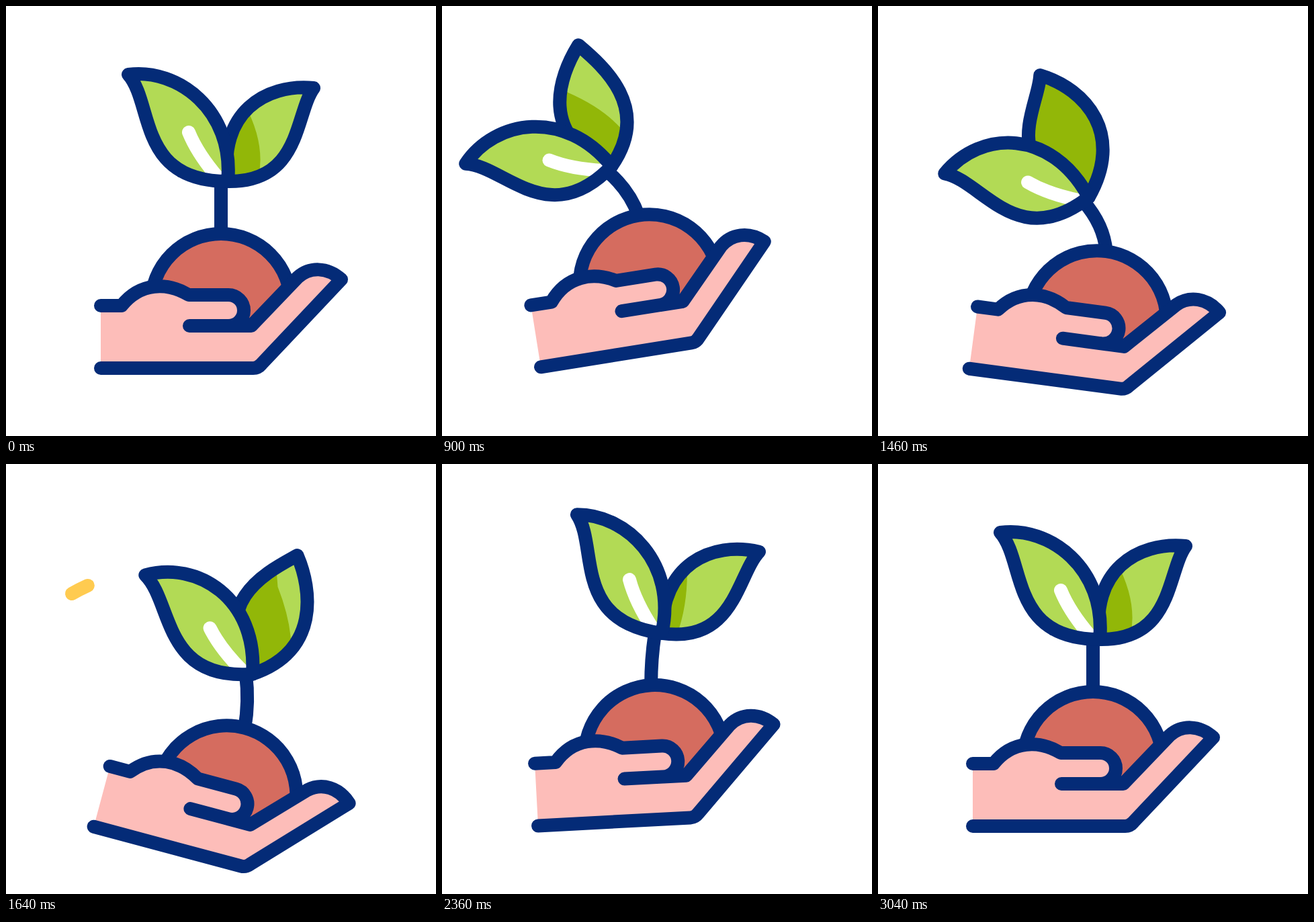
Write an HTML page that moves like this. It is 640 px wide and 640 px high and loops after 3600 ms.

```html
<!DOCTYPE html>
<html lang="en">
<head>
<meta charset="utf-8">
<title>Seedling in hand</title>
<style>
  html, body { margin: 0; width: 100%; height: 100%; overflow: hidden; background: #fff; }
  svg { display: block; width: 100vw; height: 100vh; }
  .line { stroke: #042b77; stroke-width: 20; stroke-linecap: round; stroke-linejoin: round; }
</style>
</head>
<body>
<svg viewBox="0 0 640 640" fill="none">
  <defs>
    <clipPath id="rightClip"><path id="rightMask"/></clipPath>
    <clipPath id="leftClip"><path id="leftMask"/></clipPath>
  </defs>
  <path id="wind" d="M98 193C160 158 240 143 324 144" pathLength="100"
        stroke="#ffcb50" stroke-width="20" stroke-linecap="round"/>
  <g id="hand">
    <path id="stem" class="line"/>
    <g id="leaves">
      <path id="rightFill" fill="#b2da55"/>
      <path id="shade" fill="#92b708" clip-path="url(#rightClip)"/>
      <path id="rightLine" class="line"/>
      <path id="leftFill" fill="#b2da55"/>
      <g clip-path="url(#leftClip)">
        <path d="M-58-73Q-45-41-14-5" stroke="#fff" stroke-width="20" stroke-linecap="round"/>
      </g>
      <path id="leftLine" class="line"/>
    </g>
    <path class="line" fill="#d56c5f" d="M216 443A104 104 0 0 1 424 443L365 480H240Z"/>
    <path class="line" fill="#fdbdb9" d="M141 446H172C200 411 240 411 272 430H331a23 23 0 0 1 0 46H365
      L434 404C452 388 478 388 499 407L380 533Q375 539 368 539H141M273 476H340"/>
  </g>
</svg>
<script>
const LOOP = 3600;
const el = id => document.getElementById(id);
const set = (id, name, value) => el(id).setAttribute(name, value);
const sin = deg => Math.sin(deg * Math.PI / 180);
const cos = deg => Math.cos(deg * Math.PI / 180);
const clamp = (v, low, high) => Math.max(low, Math.min(high, v));
const mix = (a, b, k) => a + (b - a) * k;

// Swings from one [time, value] turning point to the next with sine easing.
const swing = (...turns) => t => turns.reduce((value, [time, target], i) => {
  if (!i) return target;
  const from = turns[i - 1][0];
  return mix(value, target, (1 - cos(180 * clamp((t - from) / (time - from), 0, 1))) / 2);
}, 0);

const handAngle = swing([400, 0], [1000, -9.7], [1770, 16.8], [2480, -4.5], [3040, 0]);
const plantAngle = swing([400, 0], [1250, -58], [2110, 32], [2520, 0]);
const leafFlip = swing([600, 0], [1300, 1], [2060, 0]);

// Leaf points around the foot at 0,0: two controls up, the tip, two controls down.
const LEFT = [[10, -106], [-75, -169], [-148, -159], [-110, -116], [-135, 0]];
const LEFT_FULL = [[20, -116], [-65, -179], [-148, -159], [-110, -116], [-135, 0]];
const RIGHT = [[-14, -101], [55, -146], [128, -139], [100, -101], [110, 2]];
const RIGHT_TURNED = [[-95, -122], [22, -154], [45, -194], [96, -132], [97, -46]];

function setLeaf(side, from, to, k) {
  const p = from.map(([x, y], i) => [mix(x, to[i][0], k), mix(y, to[i][1], k)].join(' '));
  const d = `M0 0C${p[0]} ${p[1]} ${p[2]}C${p[3]} ${p[4]} 0 0Z`;
  for (const part of ['Mask', 'Fill', 'Line']) set(side + part, 'd', d);
}

function drawPlant(bend, flip) {
  const length = 78 + Math.abs(bend) * .08;
  const x = 320 + length * sin(bend * .71), y = 339 - length * cos(bend * .71);
  set('stem', 'd', `M320 339Q${320 + 40 * sin(bend * .28)} ${339 - 40 * cos(bend * .28)} ${x} ${y}`);
  set('leaves', 'transform',
    `translate(${x + 10 * cos(bend)} ${y + 10 * sin(bend)}) rotate(${bend})`);
  setLeaf('left', LEFT, LEFT_FULL, flip);
  setLeaf('right', RIGHT, RIGHT_TURNED, flip);

  // The shade narrows as the plant leans right and covers the turned leaf.
  const narrow = clamp(bend / 16, 0, 1), cover = 280 * flip ** 6;
  const top = 25 + 20 * flip - 4 * narrow + cover;
  set('shade', 'd', `M-120-260H${top}V${-115 - 20 * flip}` +
    `Q${60 - 38 * narrow + cover}-50 ${43 - 33 * narrow + cover} 5V60H-120Z`);
}

function drawWind(t) {
  const head = clamp((t - 1600) / 3.6, 0, 100), tail = clamp((t - 1680) / 4, 0, 100);
  set('wind', 'visibility', head > tail ? 'visible' : 'hidden');
  set('wind', 'stroke-dasharray', `${head - tail} 500`);
  set('wind', 'stroke-dashoffset', -tail);
}

function draw(t) {
  set('hand', 'transform', `rotate(${handAngle(t)} 133 500)`);
  drawPlant(plantAngle(t), leafFlip(t));
  drawWind(t);
}

const start = performance.now();
function frame() {
  draw((performance.now() - start) % LOOP);
  requestAnimationFrame(frame);
}
frame();
</script>
</body>
</html>
```
